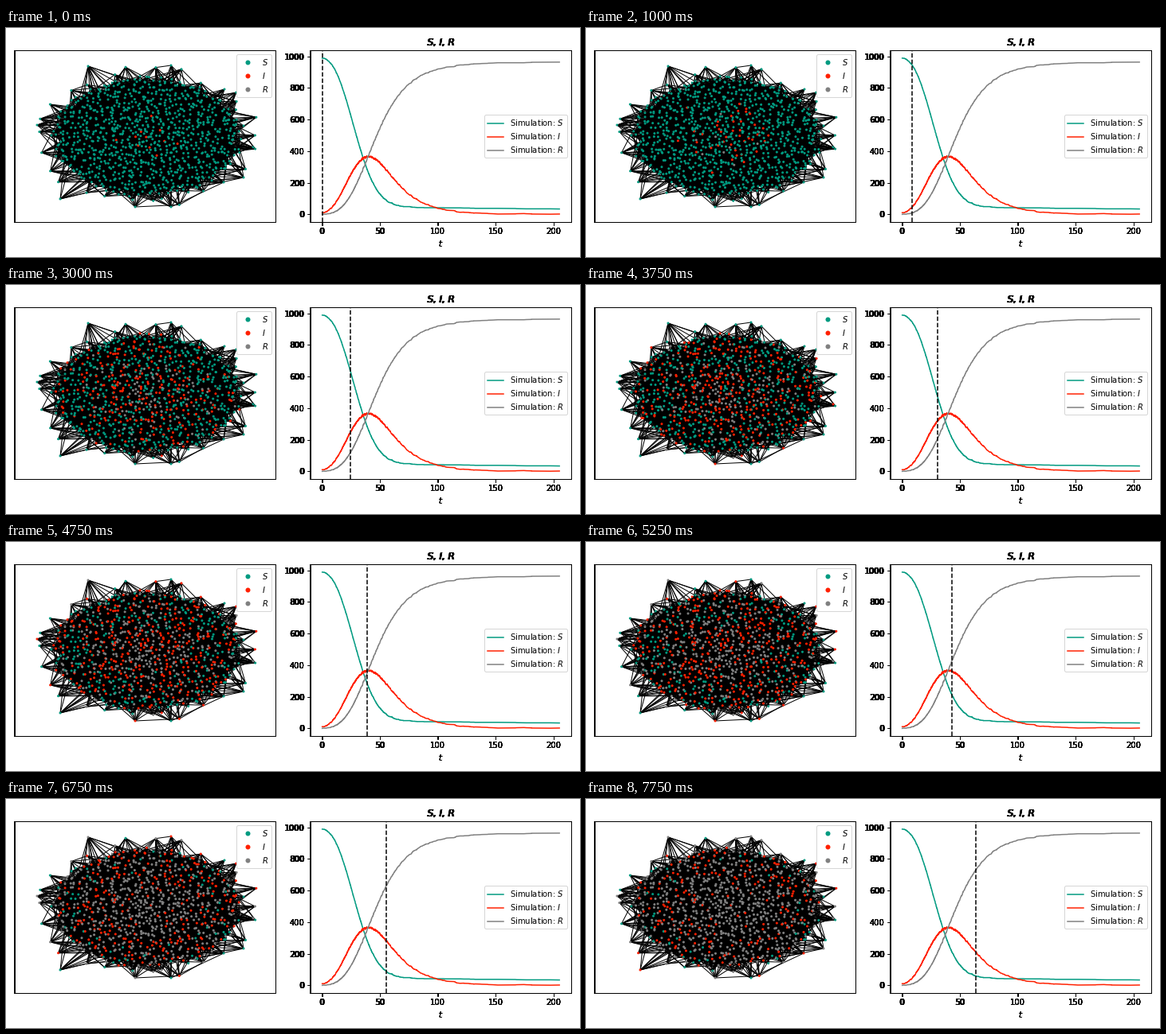
Animation of 720 by 288 pixels, one loop 8000 ms. Source, as a matplotlib script:

```python
import numpy as np
import matplotlib.pyplot as plt
from matplotlib.animation import FuncAnimation
from matplotlib.collections import LineCollection
from matplotlib.lines import Line2D
from matplotlib.patches import Ellipse

W, H, DPI = 720, 288, 72
FRAMES, INTERVAL = 32, 250
T_END, STEP = 205, 2.05
N, N_SEEDS, N_FRINGE = 1000, 10, 26
MEAN_STAY = 20
COLORS = {"S": "#009a80", "I": "#ff2000", "R": "gray"}
TOP, BOTTOM = 27.9, 244.2
NET_X, PLOT_X = (11.2, 338.2), (381.8, 709.0)
CENTER, RADII = np.array([176.5, 136.5]), np.array([118, 75])
TIPS = [(103, 48), (207, 47), (274, 77), (298, 123), (310, 150), (298, 188),
        (207, 225), (162, 225), (68, 215), (39, 122)]
GOLDEN = (np.sqrt(5) - 1) / 2

rng = np.random.default_rng(7)


def ring(radius, angle):
    """Points on ellipses around the centre of the network."""
    return CENTER + RADII * np.column_stack(
        [radius * np.cos(angle), radius * np.sin(angle)])


def make_nodes():
    n = N - N_FRINGE - len(TIPS)
    i = np.arange(n)
    inner = ring(((i + 0.5) / n) ** 0.54, 2 * np.pi * GOLDEN * i)
    inner += rng.normal(0, 2.4, inner.shape)
    turn = 2 * np.pi * (np.arange(N_FRINGE) + rng.uniform(-0.3, 0.3, N_FRINGE))
    fringe = ring(rng.uniform(1.06, 1.22, N_FRINGE), turn / N_FRINGE)
    return np.vstack([inner, fringe, TIPS])


def make_edges(pos, rho):
    """Links of the outer nodes; the core is solid black anyway."""
    return [(pos[i], pos[j]) for i in np.flatnonzero(rho > 0.82)
            for j in rng.choice(N, 10 if rho[i] > 1.05 else 7, replace=False)]


def susceptible(t):
    fast = np.exp(-(t / 33.8) ** 2.35)
    return 33 + 897 * fast + 60 * np.exp(-t / 50)


def run_epidemic(rho):
    """Times at which each node falls ill and recovers."""
    t = np.linspace(0, T_END, 4000)
    ever_ill = N - susceptible(t)
    n_ill = int(ever_ill[-1])
    ranks = np.arange(N_SEEDS, n_ill) + rng.normal(0, 3, n_ill - N_SEEDS)
    starts = np.interp(np.sort(ranks), ever_ill, t)

    # Central nodes tend to be reached first
    order = np.argsort(0.65 * rho + rng.random(N))[:n_ill]
    ill_from, well_from = np.full((2, N), np.inf)
    ill_from[order] = np.concatenate([np.zeros(N_SEEDS), starts])
    spread = (np.arange(n_ill) + 0.5) * GOLDEN % 1
    well_from[order] = ill_from[order] - MEAN_STAY * np.log(1 - spread)
    return ill_from, well_from


def count_states(ill_from, well_from):
    stamps = np.sort(np.concatenate([ill_from, well_from]))
    stamps = np.append(stamps[stamps <= T_END], T_END)
    ill = np.searchsorted(np.sort(ill_from), stamps, "right")
    well = np.searchsorted(np.sort(well_from), stamps, "right")
    return stamps, (N - ill, ill - well, well)


def panel(span, shift=0):
    left, right = span[0] + shift, span[1]
    return fig.add_axes([left / W, 1 - BOTTOM / H,
                         (right - left) / W, (BOTTOM - TOP) / H])


def style_network(ax):
    ax.set(xlim=NET_X, ylim=(BOTTOM, TOP), xticks=[], yticks=[])


def style_plot(ax):
    ax.set(xlim=(-T_END * 0.05, T_END * 1.05), ylim=(-49.5, 1039.5),
           xticks=range(0, 201, 50), yticks=range(0, 1001, 200))
    ax.set_title("$S$, $I$, $R$")
    ax.set_xlabel("$t$")


pos = make_nodes()
rho = np.hypot(*((pos - CENTER) / RADII).T)
ill_from, well_from = run_epidemic(rho)
stamps, counts = count_states(ill_from, well_from)

fig = plt.figure(figsize=(W / DPI, H / DPI), dpi=DPI, facecolor="white")
net, plot = panel(NET_X), panel(PLOT_X)
style_network(net)
style_plot(plot)

net.add_patch(Ellipse(CENTER, *(RADII * 1.8), color="black", zorder=1))
net.add_collection(LineCollection(make_edges(pos, rho), colors="black",
                                  linewidths=1, zorder=1), autolim=False)
dots = net.scatter(*pos.T, s=4, linewidths=1, zorder=2)
handles = [Line2D([], [], color=c, marker="o", markeredgewidth=0,
                  linestyle="None", label=f"${name}$")
           for name, c in COLORS.items()]
net.legend(handles=handles, loc="upper right")

for (name, c), values in zip(COLORS.items(), counts):
    plot.plot(stamps, values, color=c, label=f"Simulation: ${name}$")
plot.legend(loc="center right")
cursor = plot.axvline(0, color="black", linestyle="--")

# Overprinting with a slight shift gives frames and labels their heavy look
for shift in (0, 0, 0, -0.8, -0.8, -0.8):
    for span, style in ((NET_X, style_network), (PLOT_X, style_plot)):
        layer = panel(span, shift)
        layer.patch.set_visible(False)
        style(layer)

palette = np.array(list(COLORS.values()))


def update(frame):
    t = frame * STEP
    state = (ill_from <= t).astype(int) + (well_from <= t)
    dots.set_color(palette[state])
    cursor.set_xdata([t, t])
    return dots, cursor


anim = FuncAnimation(fig, update, frames=FRAMES, interval=INTERVAL,
                     repeat=True, repeat_delay=0, blit=False)
plt.show()
```
